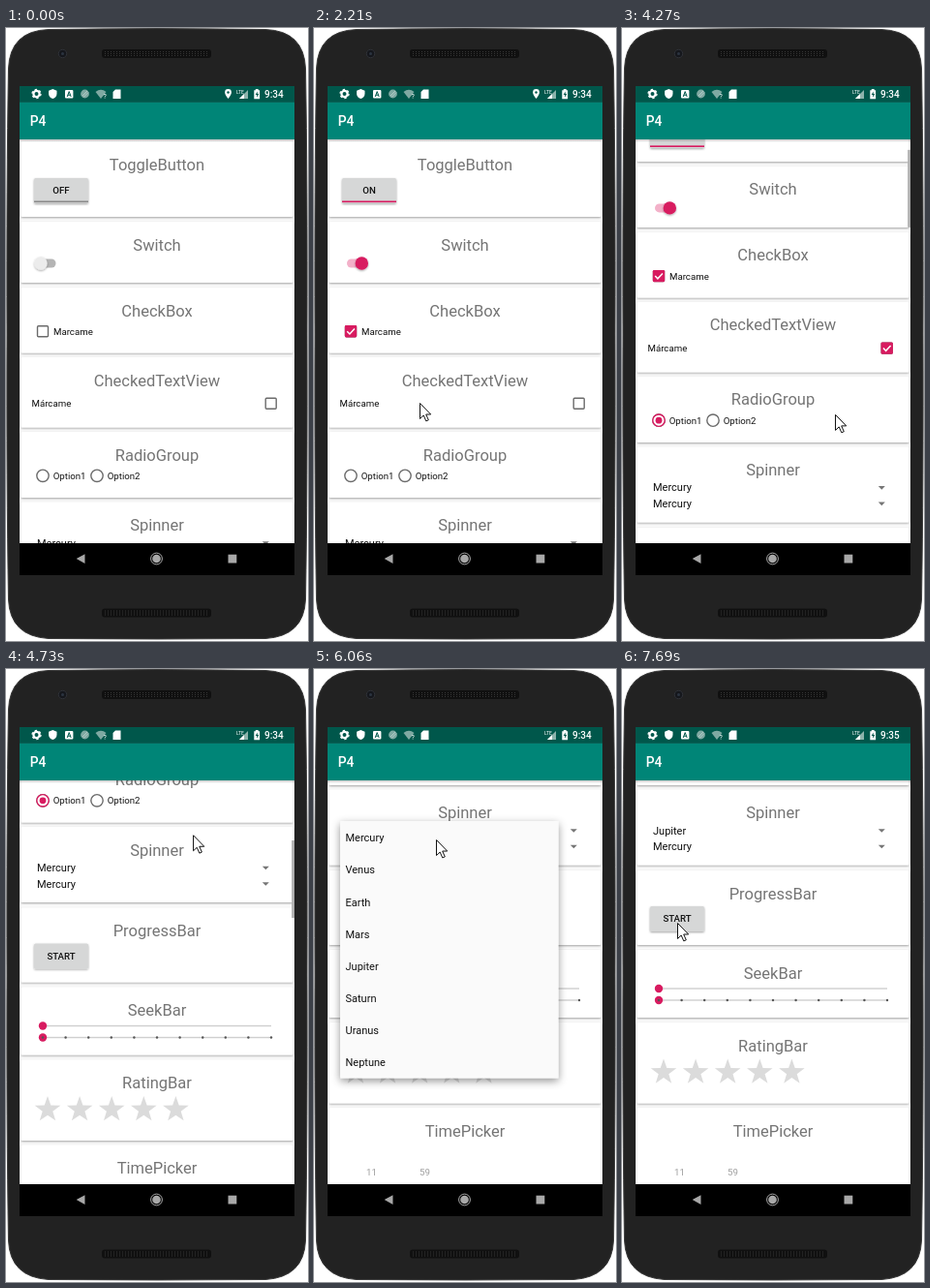
Recreate the animation shown at these times as an HTML page. Size 312 px wide and 633 px high, loop 8000 ms.

```html
<!DOCTYPE html>
<html lang="es">
<head>
<meta charset="utf-8">
<title>P4</title>
<style>
  html, body { margin: 0; width: 100%; height: 100%; overflow: hidden; background: #fff; }
  svg { display: block; width: 100vw; height: 100vh; }
  text { font: 9.66px Roboto, sans-serif; fill: #111; }
  .title { font-size: 16.5px; fill: #757575; text-anchor: middle; }
  .button { font-weight: 500; text-anchor: middle; }
  .item { font-size: 11px; }
  .dim { fill: #a0a0a0; text-anchor: middle; }
  .bar { font-size: 13.8px; font-weight: 500; fill: #fff; }
  .clock { font-size: 10px; font-weight: 500; fill: #fff; }
  .off { fill: none; stroke: #6b6b6b; stroke-width: 1.4; }
</style>
</head>
<body>
<svg id="stage" viewBox="0 0 312 633"></svg>
<script>
const PINK = '#d81b60';
const LOOP = 8000;
const range = n => [...Array(n).keys()];

// ---- drawing helpers ----
const rect = (x, y, w, h, fill, extra = '') =>
  `<rect x="${x}" y="${y}" width="${w}" height="${h}" fill="${fill}" ${extra}/>`;
const circle = (x, y, r, fill, extra = '') =>
  `<circle cx="${x}" cy="${y}" r="${r}" fill="${fill}" ${extra}/>`;
const path = (d, fill, extra = '') => `<path d="${d}" fill="${fill}" ${extra}/>`;
const text = (x, y, label, cls = '', extra = '') =>
  `<text x="${x}" y="${y}" class="${cls}" ${extra}>${label}</text>`;
const group = (id, content, extra = '') => `<g id="${id}" ${extra}>${content}</g>`;

const card = (top, bottom, title, content) =>
  rect(15.5, top, 281, bottom - top, '#fff', 'rx="1.5" filter="url(#cardShadow)"') +
  text(156, top + 29.5, title, 'title') + content;

const button = (y, label, id) =>
  rect(29, y, 56, 26, '#d6d7d7', 'rx="1.5" filter="url(#cardShadow)"') +
  text(57, y + 16.2, label, 'button', `id="${id}"`);

const checkbox = (id, x, y) =>
  `<rect x="${x - 5.5}" y="${y - 5.5}" width="11" height="11" rx="1" class="off"/>` +
  group(id, rect(x - 6.2, y - 6.2, 12.4, 12.4, PINK, 'rx="1.4"') +
    path(`M${x - 3.8} ${y}l2.7 2.8 5-5.4`, 'none', 'stroke="#fff" stroke-width="1.5"'));

const radio = (id, x, y) =>
  `<circle cx="${x}" cy="${y}" r="6.2" class="off"/>` +
  group(id, circle(x, y, 6.2, '#fff', `stroke="${PINK}" stroke-width="1.4"`) + circle(x, y, 3.4, PINK));

const spinnerRow = (y, id) =>
  text(32, y + 3.8, 'Mercury', 'item', `id="${id}"`) + path(`M264.8 ${y - 1.6}h7l-3.5 3.6z`, '#757575');

const star = (cx, cy) => {
  const points = range(10).map(i => {
    const r = i % 2 ? 5.6 : 14, a = i * Math.PI / 5;
    return `${(cx + r * Math.sin(a)).toFixed(1)},${(cy - r * Math.cos(a)).toFixed(1)}`;
  });
  return `<polygon points="${points.join(' ')}" fill="#dbdbdb"/>`;
};

const speaker = y => rect(99, y, 113, 9, '#101010', 'rx="3"') +
  [2.5, 4.5, 6.5].map(dy => path(`M102 ${y + dy}h107`, 'none', 'stroke="#343434" stroke-dasharray="1 2"')).join('');

// ---- scene ----
const page =
  card(117, 195, 'ToggleButton', button(155, 'OFF', 'toggle') + rect(29, 178.5, 56, 1.6, '#8a8a8a', 'id="toggleLine"')) +
  card(200, 263, 'Switch', rect(34, 238.5, 17.5, 9, '#b4b4b4', 'rx="4.5" id="track"') +
    circle(36, 243, 6.7, '#ececec', 'id="thumb" filter="url(#cardShadow)"')) +
  card(268, 335.5, 'CheckBox', checkbox('check', 38, 313.2) + text(49, 316.8, 'Marcame')) +
  card(340, 412.5, 'CheckedTextView', text(26.5, 391.2, 'Márcame') + checkbox('checkedView', 273.7, 387.7)) +
  card(417, 485, 'RadioGroup', radio('radio1', 38, 462.3) + text(48.7, 465.8, 'Option1') +
    radio('radio2', 94, 462.3) + text(104.7, 465.8, 'Option2')) +
  card(489.5, 567.5, 'Spinner', spinnerRow(531.8, 'planet') + spinnerRow(548.3, 'planet2')) +
  card(573, 650, 'ProgressBar', button(610, 'START', 'start')) +
  card(655, 725, 'SeekBar', [695, 707].map(y =>
      rect(38, y - .7, 236, 1.4, '#cfcfcf') + circle(38, y, 4.2, PINK)).join('') +
    range(11).map(i => circle(38 + 23.6 * i, 707, 1.2, '#555')).join('')) +
  card(730, 813.5, 'RatingBar', range(5).map(i => star(43 + 33.1 * i, 781.5)).join('')) +
  card(818, 1060, 'TimePicker', text(59.5, 887.5, '11', 'dim') + text(114.5, 887.5, '59', 'dim'));

const planets = ['Mercury', 'Venus', 'Earth', 'Mars', 'Jupiter', 'Saturn', 'Uranus', 'Neptune'];
const popup = rect(27, 157, 225.5, 265.5, '#fafafa', 'rx="1.5" filter="url(#popupShadow)"') +
  planets.map((name, i) => text(32.5, 178.3 + 33.1 * i, name, 'item')).join('');

const statusIcons =
  circle(31.5, 68, 3.1, 'none', 'stroke="#fff" stroke-width="2.2"') +
  circle(31.5, 68, 4.5, 'none', 'stroke="#fff" stroke-width="1.3" stroke-dasharray="2.3 2.41"') +
  path('M48.3 63l4.2 1.7v3q0 3.7-4.2 5.4q-4.2-1.7-4.2-5.4v-3z', '#fff') +
  rect(61, 64, 8.4, 8.4, '#fff', 'rx="1"') +
  path('M63.2 71l2-5.4 2 5.4m-3.3-1.8h2.6', 'none', 'stroke="#00574b"') +
  circle(81.5, 68, 4.4, '#7fa9a2') + path('M79 70l5-5m-4 6.500l5-5', 'none', 'stroke="#c0d5d1" stroke-width=".8"') +
  path('M92.500 66q5.500-4.500 11 0l-5.500 7z', '#7fa9a2') + text(100.500, 73, '?', '', 'style="fill:#fff;font-size:7px"') +
  path('M113 63.500h5.500v9.500h-8v-7z', '#fff') +
  group('pin', path('M229.500 63a3.400 3.400 0 0 1 3.400 3.400q0 2.400-3.400 6.600q-3.400-4.200-3.400-6.600a3.400 3.400 0 0 1 3.400-3.400z', '#fff') +
    circle(229.500, 66.500, 1.200, '#00574b')) +
  path('M250 64v9h-9z', '#8db3ac') + path('M246 68v5h-5z', '#fff') +
  text(238, 68, 'LTE', '', 'style="fill:#fff;font-size:5px"') +
  path('M257.800 63h2.800v1.200h1.500v9h-5.800v-9h1.500z', '#fff') +
  path('M259.700 65.500l-2 3.600h1.500v2.600l2-3.600h-1.500z', '#00574b');

document.getElementById('stage').innerHTML = `
  <defs>
    <filter id="cardShadow" x="-20%" y="-20%" width="140%" height="150%">
      <feDropShadow dx="0" dy="1" stdDeviation=".8" flood-opacity=".36"/></filter>
    <filter id="popupShadow" x="-10%" y="-10%" width="120%" height="120%">
      <feDropShadow dx="0" dy="3" stdDeviation="4" flood-opacity=".42"/></filter>
    <linearGradient id="barShadow" x2="0" y2="1">
      <stop stop-opacity=".22"/><stop offset="1" stop-opacity="0"/></linearGradient>
    <clipPath id="view">${rect(14, 115, 284, 417, '#000')}</clipPath>
  </defs>` +
  path('M44 1.500Q156-.5 268 1.500Q308 3 309.500 42Q311.500 160 311 316Q311.500 470 309.500 590Q308 628 268 630.500Q156 631.500 44 630.500Q4 628 2.500 590Q.5 470 1 316Q.5 160 2.500 42Q4 3 44 1.500Z',
    '#222', 'stroke="#3a3a3a"') +
  speaker(22) + speaker(599.5) + circle(58.5, 26.5, 4.2, '#15171c', 'stroke="#303238"') + circle(58.5, 26.5, 1.5, '#2c3440') +
  rect(14, 115, 284, 417, '#fafafa') +
  `<g clip-path="url(#view)">${group('page', page)}</g>` +
  rect(14, 115, 284, 3, 'url(#barShadow)') +
  rect(295.2, 115, 2.8, 80, '#b0b0b0', 'id="scrollbar"') +
  rect(14, 60, 284, 16.5, '#00574b') + rect(14, 76.5, 284, 38.5, '#008577') +
  statusIcons + text(267, 71.7, '9:34', 'clock', 'id="clock"') + text(24.7, 101, 'P4', 'bar') +
  rect(14, 532, 284, 33, '#000') +
  path('M81.500 543.300v9.600l-8.800-4.800z', '#a8a8a8') +
  circle(155.5, 548, 4.3, '#a8a8a8') + circle(155.5, 548, 5.9, 'none', 'stroke="#a8a8a8"') +
  rect(229.5, 543.7, 8.8, 8.8, '#a8a8a8') +
  group('popup', popup) +
  group('cursor', path('M.5.500V16.500l3.700-3.500 2.600 5.900 2.500-1.100-2.600-5.800h5z', '#fff', 'stroke="#111" stroke-width="1"'));

// ---- timing ----
// Screen updates come in bursts: [first update, last update, number of updates].
const bursts = [
  [60, 580, 8], [810, 1110, 5], [1330, 1710, 6], [1930, 2430, 8], [2570, 3090, 8], [3250, 3690, 7],
  [3830, 4570, 11], [4650, 5090, 7], [5230, 5530, 5], [5920, 6500, 9], [6810, 7030, 4], [7170, 7690, 8],
];
const cursorKeys = [
  [60, 224, 511], [580, 65, 175], [870, 65, 175], [1110, 46, 240], [1390, 46, 240], [1710, 69, 310],
  [1980, 69, 310], [2210, 109, 387], [2430, 110, 389], [2700, 110, 389], [3090, 97, 456],
  [3330, 97, 456], [3690, 41, 466], [3890, 41, 466], [4120, 225, 460], [4190, 224, 456],
  [4270, 220, 399], [4570, 197, 190], [4650, 196, 185], [4730, 193, 171], [5090, 193, 152],
  [5160, 193, 152], [5530, 130, 168], [5920, 130, 168], [6060, 126, 176], [6500, 100, 309],
  [7100, 100, 309], [7690, 57, 262],
];
const scrollKeys = [[4190, 0], [4270, 57], [4570, 285], [4650, 300], [4730, 327], [5090, 359], [5160, 359], [5530, 365]];
const switchKeys = [[1260, 0], [1480, 1]];
const popupKeys = [[5870, 0], [5990, 1], [6820, 1], [7030, 0]];

function snap(t) {
  const burst = bursts.filter(b => b[0] <= t).pop();
  if (!burst) return 0;
  const [start, end, count] = burst;
  const gap = (end - start) / (count - 1);
  return start + gap * Math.min(count - 1, Math.floor((t - start) / gap + .1));
}

function track(keys, t) {
  const next = keys.findIndex(k => k[0] > t);
  if (next < 0) return keys[keys.length - 1].slice(1);
  if (next === 0) return keys[0].slice(1);
  const a = keys[next - 1], b = keys[next];
  const u = (t - a[0]) / (b[0] - a[0]), eased = u * u * (3 - 2 * u);
  return a.slice(1).map((v, i) => v + (b[i + 1] - v) * eased);
}

const el = id => document.getElementById(id);
const set = (id, name, value) => el(id).setAttribute(name, value);
const show = (id, visible) => set(id, 'visibility', visible ? 'visible' : 'hidden');

function draw(t) {
  const [scroll] = track(scrollKeys, t);
  const [switched] = track(switchKeys, t);
  const toggled = t >= 810;

  set('page', 'transform', `translate(0 ${-scroll})`);
  set('scrollbar', 'y', 115 + .19 * scroll);
  show('scrollbar', scroll > 0 && t < 5920);

  el('toggle').textContent = toggled ? 'ON' : 'OFF';
  set('toggleLine', 'fill', toggled ? PINK : '#8a8a8a');
  set('thumb', 'cx', 36 + 13.3 * switched);
  set('thumb', 'fill', switched > .3 ? PINK : '#ececec');
  set('track', 'fill', switched > .3 ? '#f3b1c9' : '#b4b4b4');
  show('check', t >= 1930);
  show('checkedView', t >= 2570);
  show('radio2', t >= 3250 && t < 3830);
  show('radio1', t >= 3830);
  el('planet').textContent = t >= 6810 ? 'Jupiter' : 'Mercury';

  show('pin', t < 2350);
  el('clock').textContent = t >= 7400 ? '9:35' : '9:34';
  set('popup', 'opacity', track(popupKeys, t)[0]);
  show('cursor', t >= 60);
  set('cursor', 'transform', `translate(${track(cursorKeys, t)})`);
}

function tick() {
  draw(snap(performance.now() % LOOP));
  requestAnimationFrame(tick);
}
tick();
</script>
</body>
</html>
```
